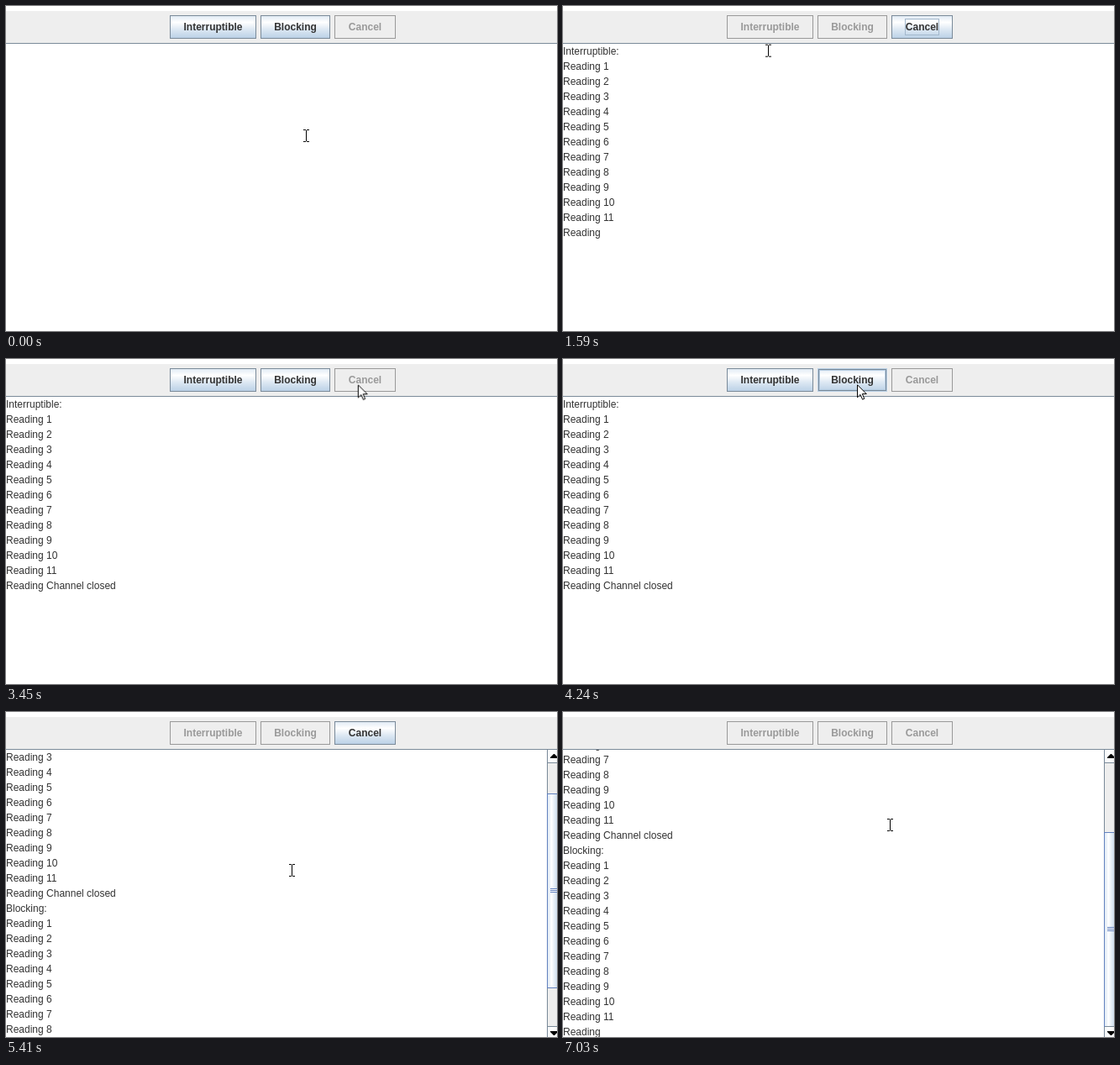
Animation of 656x387 px, one loop 8 s. Source, as an HTML page:

```html
<!DOCTYPE html>
<html lang="en">
<head>
<meta charset="utf-8">
<title>Interruptible reading</title>
<style>
:root {
  --line: #7a8a99;
  --pale: #b8cfe5;
  --glossy: linear-gradient(#dde8f3, #fff 30%, #dde8f3 60%, #b8cfe5);
  --plain: inset 0 0 0 1px var(--line);
  --hover: inset 0 0 0 1px var(--pale), inset 0 0 0 2px var(--line), inset 0 0 0 3px var(--pale);
  --down: inset 2px 2px var(--line), inset -1px -1px var(--line);
  --off: inset 0 0 0 1px #999;
  --flat: linear-gradient(#eee, #eee);
  --solid: linear-gradient(#b8cfe5, #b8cfe5);
}
html, body { margin: 0; width: 100%; height: 100%; overflow: hidden; background: #fff; }
body { position: relative; font: 12px/18px "Liberation Sans", Arial, sans-serif; color: #333; cursor: default; }
div, svg, pre, i { position: absolute; }
div, pre, svg, i, b { animation: 8s step-end infinite; }

#bar { top: 6px; left: 0; width: 100%; height: 38px; background: #eee; border-bottom: 1px solid var(--line); }
.button {
  top: 11px; height: 28px; line-height: 28px; text-align: center; font-weight: bold;
  color: var(--ink); background: var(--face); box-shadow: var(--edge);
}
.button b { position: relative; display: inline-block; }
.button b::after { content: ""; position: absolute; inset: 4px -1px; border: 1px solid var(--ring); }
#read { left: 195px; width: 103px; animation-name: read; }
#block { left: 303px; width: 83px; animation-name: block; }
#stop { left: 391px; width: 73px; animation-name: stop; }

@keyframes read {
  0%, 36.25% { --edge: var(--plain); --face: var(--glossy); --ink: #333; --ring: transparent; }
  4.375% { --edge: var(--hover); }
  12% { --edge: var(--down); --face: var(--solid); --ring: #a3b8cc; }
  16%, 58.75%, 100% { --edge: var(--off); --face: var(--flat); --ink: #999; --ring: transparent; }
}
@keyframes block {
  0%, 36.25% { --edge: var(--plain); --face: var(--glossy); --ink: #333; --ring: transparent; }
  48.06% { --edge: var(--hover); }
  57% { --edge: var(--down); --face: var(--solid); --ring: #a3b8cc; }
  16%, 58.75%, 100% { --edge: var(--off); --face: var(--flat); --ink: #999; --ring: transparent; }
}
@keyframes stop {
  0%, 36.25%, 83%, 100% { --edge: var(--off); --face: var(--flat); --ink: #999; --ring: transparent; }
  16% { --edge: var(--plain); --face: var(--glossy); --ink: #333; --ring: #a3b8cc; }
  31.6% { --edge: var(--hover); }
  33.625%, 80.375% { --edge: var(--down); --face: var(--solid); --ring: #a3b8cc; }
  58.75% { --edge: var(--plain); --face: var(--glossy); --ink: #333; --ring: transparent; }
  75.375% { --edge: var(--hover); }
}

#view { top: 45px; left: 0; width: 644px; height: 342px; overflow: hidden; }
#log { margin: 0; left: 0; top: 0; width: 644px; font: inherit; overflow: hidden; animation-name: grow, scroll; }
#log b { font-weight: normal; animation-name: closed; }
@keyframes grow {
  0% { height: 0; }
  16% { height: 108px; }
  17% { height: 234px; }
  58.75% { height: 306px; }
  59.75%, 100% { height: 468px; }
}
@keyframes closed { 0% { visibility: hidden; } 36.25%, 100% { visibility: visible; } }
@keyframes scroll {
  0% { transform: none; }
  67.625% { transform: translateY(-54px); }
  68.6% { transform: translateY(-108px); }
  69.56%, 100% { transform: translateY(-123px); }
}

#scroller { left: 644px; top: 45px; width: 17px; height: 347px; background: #eee; box-shadow: inset 1px 0 var(--line); animation-name: bar; }
#scroller .end { left: 1px; width: 16px; height: 15px; background: linear-gradient(90deg, #f4f7fa, #fff 30%, #eee); }
#up { top: 0; border-bottom: 1px solid var(--line); }
#low { top: 329px; border-top: 1px solid var(--line); }
.end svg { left: 3px; top: 5px; }
#thumb {
  top: 16px; left: 0; width: 17px; height: 232px; box-sizing: border-box; border: 1px solid #6382bf;
  background: linear-gradient(90deg, #dde8f3, #fff 30%, #dde8f3 60%, #b8cfe5); animation-name: thumb;
}
#thumb i { left: 3px; top: 112px; width: 9px; height: 5px; background: repeating-linear-gradient(#6382bf 0 1px, #fff 1px 2px); }
@keyframes bar { 0% { visibility: hidden; } 59.75%, 100% { visibility: visible; } }
@keyframes thumb {
  0% { transform: none; }
  67.625% { transform: translateY(36px); }
  68.6% { transform: translateY(72px); }
  69.56%, 100% { transform: translateY(82px); }
}

#pointer { left: 0; top: 0; animation-name: move; }
#glow { left: -12px; top: -12px; width: 24px; height: 24px; border-radius: 50%; background: rgba(238, 233, 0, .6); animation-name: click; }
#beam { left: -3px; top: -7px; animation-name: beam; }
#arrow { left: 0; top: 0; animation-name: arrow; }
@keyframes click {
  0%, 16%, 36.25%, 58.75%, 83%, 100% { visibility: hidden; }
  12%, 33.625%, 57%, 80.375% { visibility: visible; }
}
@keyframes beam {
  0%, 19.875%, 59.75%, 85.125%, 100% { visibility: visible; }
  4.375%, 30.64%, 75.375% { visibility: hidden; }
}
@keyframes arrow {
  0%, 19.875%, 59.75%, 85.125%, 100% { visibility: hidden; }
  4.375%, 30.64%, 75.375% { visibility: visible; }
}
@keyframes move {
  0% { transform: translate(357px, 154px); }
  .875% { transform: translate(357px, 154px); animation-timing-function: steps(6, jump-start); }
  6.125% { transform: translate(246px, 13px); }
  8.125% { transform: translate(246px, 13px); animation-timing-function: steps(2, jump-start); }
  10.125% { transform: translate(246px, 23px); }
  19.875% { transform: translate(246px, 23px); animation-timing-function: steps(3, jump-start); }
  22.78% { transform: translate(240px, 112px); animation-timing-function: steps(2, jump-start); }
  24.72% { transform: translate(253px, 107px); }
  25.75% { transform: translate(253px, 107px); animation-timing-function: steps(7, jump-start); }
  32.6% { transform: translate(426px, 28px); }
  43.125% { transform: translate(426px, 28px); animation-timing-function: steps(5, jump-start); }
  48.06% { transform: translate(390px, 39px); animation-timing-function: steps(6, jump-start); }
  53.99% { transform: translate(350px, 30px); }
  59.75% { transform: translate(350px, 30px); animation-timing-function: steps(5, jump-start); }
  64.75% { transform: translate(340px, 188px); }
  70.53% { transform: translate(340px, 188px); animation-timing-function: steps(6, jump-start); }
  76.34% { transform: translate(430px, 22px); }
  85.125% { transform: translate(430px, 22px); animation-timing-function: steps(4, jump-start); }
  88.79%, 100% { transform: translate(389px, 134px); }
}
</style>
</head>
<body>
<div id="bar"></div>
<div class="button" id="read"><b>Interruptible</b></div>
<div class="button" id="block"><b>Blocking</b></div>
<div class="button" id="stop"><b>Cancel</b></div>
<div id="view"><pre id="log">Interruptible:
Reading 1
Reading 2
Reading 3
Reading 4
Reading 5
Reading 6
Reading 7
Reading 8
Reading 9
Reading 10
Reading 11
Reading <b>Channel closed</b>
Blocking:
Reading 1
Reading 2
Reading 3
Reading 4
Reading 5
Reading 6
Reading 7
Reading 8
Reading 9
Reading 10
Reading 11
Reading</pre></div>
<div id="scroller">
  <div class="end" id="up"><svg width="9" height="5"><path d="M4 0h1l4 4v1H0V4z"/></svg></div>
  <div id="thumb"><i></i></div>
  <div class="end" id="low"><svg width="9" height="5"><path d="M0 0h9v1L5 5H4L0 1z"/></svg></div>
</div>
<div id="pointer">
  <div id="glow"></div>
  <svg id="beam" width="7" height="15" fill="none" stroke="#000"><path d="M0 .5h3M4 .5h3M3.5 1v13M0 14.5h3M4 14.5h3"/></svg>
  <svg id="arrow" width="13" height="20" fill="#fff" stroke="#000"><path d="M.5 .8V15.8L4 12.4L6.6 18.2L8.8 17.2L6.3 11.6H11.3Z"/></svg>
</div>
</body>
</html>
```
